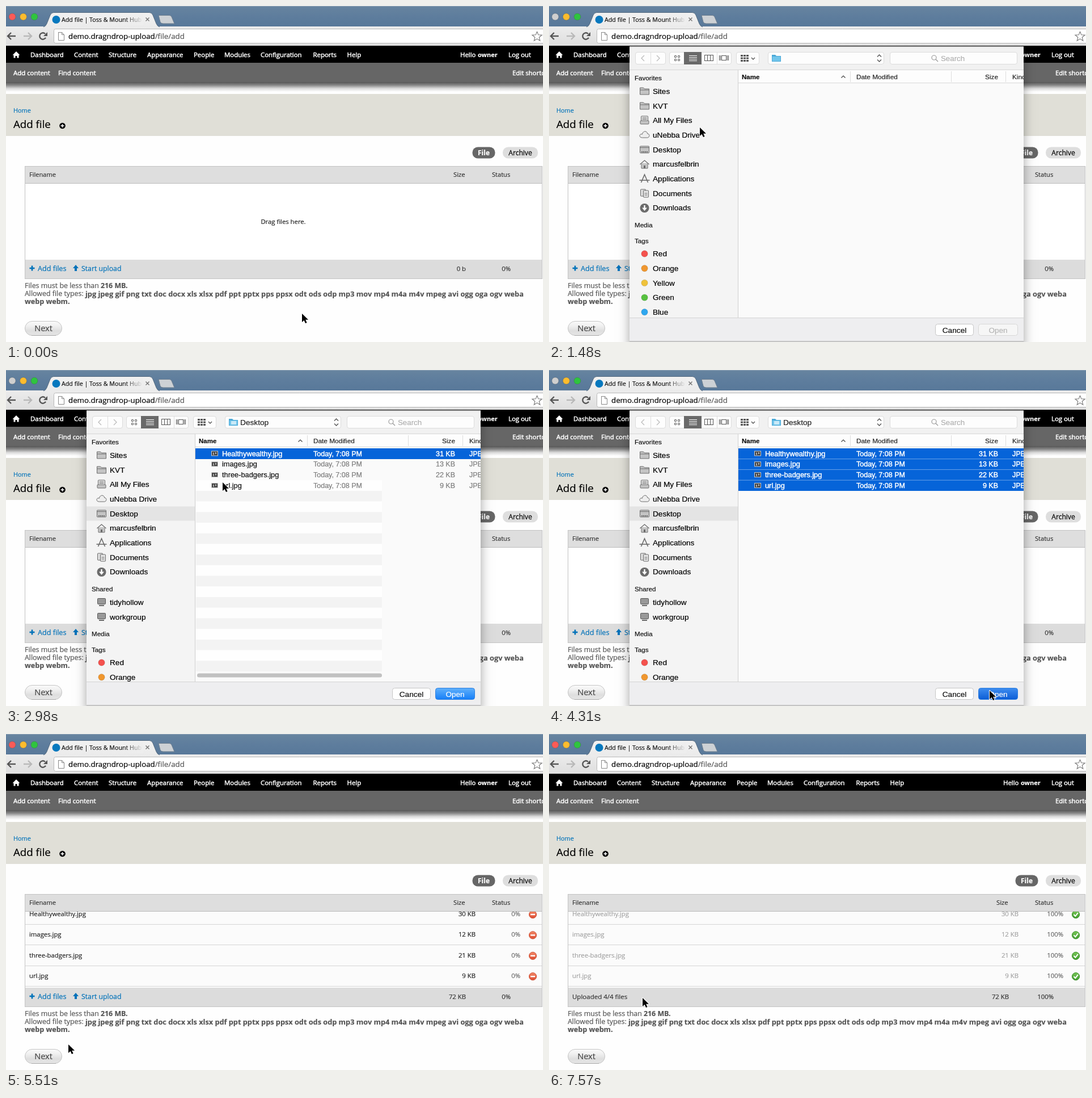
These frames come from a looping animation (947 px wide and 592 px high, 8000 ms). An HTML page with a canvas:

```html
<!DOCTYPE html>
<html lang="en">
<head>
<meta charset="utf-8">
<title>Add file</title>
<style>
html, body { margin: 0; width: 100%; height: 100%; overflow: hidden; background: #fff; }
canvas { display: block; width: 947px; height: 592px; }
</style>
</head>
<body>
<canvas id="stage" width="947" height="592"></canvas>
<script>
const W = 947, H = 592, LOOP = 8000;
const c = document.getElementById('stage').getContext('2d');
const PAGE = '"Open Sans", "Noto Sans", sans-serif';
const SYS = '"Liberation Sans", Arial, sans-serif';
const BLUE = '#0072b9';

// ---------- timing ----------
// Screen updates: first time, last time, count
const steps = [0];
for (const [a, b, n] of [[140, 590, 4], [1190, 1480, 3], [1650, 2100, 4], [2250, 3130, 7],
  [3420, 4460, 8], [4610, 4910, 3], [5210, 5510, 3], [5650, 6230, 5], [6380, 7420, 8], [7570, 7570, 1]])
  for (let i = 0; i < n; i++) steps.push(n > 1 ? Math.floor((a + (b - a) * i / (n - 1)) / 10) * 10 : a);

const path = [[0, 522, 542], [590, 88, 458], [1190, 88, 458], [1480, 266, 214], [1650, 215, 248], [1800, 215, 248],
  [2100, 400, 175], [2400, 392, 145], [2550, 392, 145], [2970, 382, 198], [3565, 382, 198], [4150, 777, 565],
  [4610, 777, 565], [4910, 690, 552], [5210, 560, 549], [5505, 110, 547], [5950, 165, 465], [8000, 165, 465]];

function pointer(t) {
  let i = 1;
  while (path[i][0] < t) i++;
  const [t0, x0, y0] = path[i - 1], [t1, x1, y1] = path[i];
  const u = (t - t0) / (t1 - t0), e = u * u * (3 - 2 * u);
  return [x0 + (x1 - x0) * e, y0 + (y1 - y0) * e];
}

// ---------- drawing helpers ----------
function rect(x, y, w, h, fill) { c.fillStyle = fill; c.fillRect(x, y, w, h); }

function grad(y0, y1, ...cols) {
  const g = c.createLinearGradient(0, y0, 0, y1);
  cols.forEach((k, i) => g.addColorStop(i / (cols.length - 1), k));
  return g;
}

function paint(fill, edge) {
  if (fill) { c.fillStyle = fill; c.fill(); }
  if (edge) { c.strokeStyle = edge; c.lineWidth = 1; c.stroke(); }
}

function box(x, y, w, h, r, fill, edge) {
  c.beginPath();
  c.roundRect(x, y, w, h, r);
  paint(fill, edge);
}

function disc(x, y, r, fill, edge) {
  c.beginPath();
  c.arc(x, y, r, 0, 7);
  paint(fill, edge);
}

function trace(pts) {
  c.beginPath();
  for (let i = 0; i < pts.length; i += 2) c.lineTo(pts[i], pts[i + 1]);
}

function line(color, width, ...pts) {
  trace(pts);
  c.strokeStyle = color;
  c.lineWidth = width;
  c.stroke();
}

function poly(fill, ...pts) {
  trace(pts);
  c.closePath();
  paint(fill);
}

// y is the middle of the line; heavy thickens the strokes
function text(s, x, y, size, color, { face = PAGE, weight = 400, align = 'left', heavy = .2 } = {}) {
  c.font = `${weight} ${size}px ${face}`;
  c.textAlign = align;
  c.fillStyle = c.strokeStyle = color;
  c.lineWidth = heavy;
  c.lineJoin = 'round';
  const base = Math.round(y + size * .36);
  c.fillText(s, x, base);
  c.strokeText(s, x, base);
  c.lineJoin = 'miter';
  return c.measureText(s).width;
}
const sys = (s, x, y, size, color, o) => text(s, x, y, size, color, { face: SYS, ...o });

function clipped(x, y, w, h, draw) {
  c.save();
  c.beginPath();
  c.rect(x, y, w, h);
  c.clip();
  draw();
  c.restore();
}

// ---------- browser ----------
function browser(inactive) {
  rect(0, 0, W, 37, grad(0, 37, '#67849f', '#5e7d9d', '#587899'));
  rect(0, 0, W, 1, '#8aa0b4');
  rect(0, 36, W, 34, grad(36, 70, '#ececec', '#dedede'));
  [inactive ? '#cfcfcf' : '#fc5b57', '#fdbc2e', '#2fc43f'].forEach((k, i) => disc(11 + i * 19.5, 19, 6, k, 'rgba(60,60,60,.25)'));

  c.beginPath();
  c.moveTo(66, 37);
  c.quadraticCurveTo(70, 36, 72, 31);
  c.lineTo(78, 16);
  c.quadraticCurveTo(80, 11.5, 84, 11.5);
  c.lineTo(253, 11.5);
  c.quadraticCurveTo(257, 11.5, 259, 16);
  c.lineTo(265, 31);
  c.quadraticCurveTo(267, 36, 271, 37);
  paint(grad(12, 37, '#f1f1f1', '#ebebeb'), '#52697f');

  c.beginPath();
  c.moveTo(269, 16.5);
  c.lineTo(288, 16.5);
  c.quadraticCurveTo(291, 16.5, 292, 19);
  c.lineTo(297, 31);
  c.lineTo(277, 31);
  c.quadraticCurveTo(273, 31, 272, 28);
  c.closePath();
  paint('#cdd1d5', '#6d7e8f');

  disc(88.5, 24, 7, '#0678be');
  clipped(98, 12, 142, 25, () => text('Add file | Toss & Mount Hub', 98, 24, 10.7, '#111'));
  const fade = c.createLinearGradient(208, 0, 241, 0);
  fade.addColorStop(0, 'rgba(238,238,238,0)');
  fade.addColorStop(1, '#eee');
  rect(208, 15, 34, 19, fade);
  line('#777', 1.4, 246.5, 20.5, 252.5, 26.5);
  line('#777', 1.4, 252.5, 20.5, 246.5, 26.5);

  const arrow = (x, d, k) => {
    line(k, 2.4, x - 7 * d, 53, x + 7 * d, 53);
    line(k, 2.4, x + d, 47, x + 7 * d, 53, x + d, 59);
  };
  arrow(10, -1, '#555');
  arrow(38, 1, '#b8b8b8');
  c.beginPath();
  c.arc(65, 53, 5.7, .5, 5.5);
  c.strokeStyle = '#555';
  c.lineWidth = 2.4;
  c.stroke();
  poly('#555', 73, 46, 73, 53, 66, 53);

  box(84.5, 40.5, 880, 25, 3, '#fff', '#b9b9b9');
  poly('#fff', 92, 46, 99, 46, 103, 50, 103, 61, 92, 61);
  line('#888', 1, 92.5, 46.5, 98.5, 46.5, 102.5, 50.5, 102.5, 60.5, 92.5, 60.5, 92.5, 46);
  line('#888', 1, 98.5, 46.5, 98.5, 50.5, 102.5, 50.5);
  const w = text('demo.dragndrop-upload', 110, 53, 13.3, '#000');
  text('/file/add', 110 + w, 53, 13.3, '#555');

  const star = [];
  for (let i = 0; i <= 10; i++) {
    const r = i % 2 ? 3.9 : 9, a = i * Math.PI / 5 - Math.PI / 2;
    star.push(936.5 + r * Math.cos(a), 54 + r * Math.sin(a));
  }
  line('#777', 1.1, ...star);
}

// ---------- page ----------
function adminBar() {
  rect(0, 70, W, 31, '#000');
  rect(0, 100, W, 35, '#666');
  rect(0, 134, W, 17, grad(134, 151, '#555', '#8a8a8a', '#dadada', '#fff'));
  poly('#fff', 18, 80, 24.5, 86.5, 22.5, 86.5, 22.5, 91.5, 19.5, 91.5, 19.5, 88, 16.5, 88, 16.5, 91.5, 13.5, 91.5, 13.5, 86.5, 11.5, 86.5);
  const nav = (s, x, y) => text(s, x, y, 11.4, '#fff', { heavy: .5 });
  [['Dashboard', 43], ['Content', 120], ['Structure', 181], ['Appearance', 249], ['People', 331], ['Modules', 385],
    ['Configuration', 449], ['Reports', 541.5], ['Help', 601.5], ['Hello', 801], ['Log out', 886]].forEach(([s, x]) => nav(s, x, 86));
  text('owner', 832, 86, 11, '#fff', { weight: 700 });
  nav('Add content', 13, 117.5);
  nav('Find content', 92, 117.5);
  nav('Edit shortcuts', 893, 117.5);
}

function page() {
  rect(0, 70, W, H - 70, '#fefefe');
  adminBar();
  rect(0, 155, W, 74, '#e0dfd7');
  text('Home', 13, 184.5, 10.9, BLUE);
  text('Add file', 13, 208.5, 18.7, '#000');
  disc(99.5, 211, 5.3, '#000');
  line('#fff', 1.6, 96.5, 211, 102.5, 211);
  line('#fff', 1.6, 99.5, 208, 99.5, 214);

  box(822.5, 248.5, 40, 20, 9.5, '#666');
  text('File', 842.5, 258.5, 11.9, '#fff', { weight: 700, align: 'center' });
  box(876, 248.5, 62, 20, 9.5, '#dedede');
  text('Archive', 907, 258.5, 12.1, '#111', { align: 'center', heavy: .3 });

  const grey = '#555', size = 12.4, bold = { weight: 700 };
  let w = text('Files must be less than ', 33, 493, size, grey);
  text('216 MB.', 33 + w, 493, size, grey, bold);
  w = text('Allowed file types: ', 33, 507, size, grey);
  text('jpg jpeg gif png txt doc docx xls xlsx pdf ppt pptx pps ppsx odt ods odp mp3 mov mp4 m4a m4v mpeg avi ogg oga ogv weba',
    33 + w, 507, 12.74, grey, bold);
  text('webp webm.', 33, 520.5, 12.6, grey, bold);

  box(33.5, 555.5, 65, 25, 12.5, grad(555, 581, '#fbfbfb', '#f0f0f0', '#dedede', '#e6e6e6'), '#c4c4c4');
  line('#a8a8a8', 1, 45, 580.5, 88, 580.5);
  text('Next', 66, 568, 14.6, '#444', { align: 'center' });
}

// ---------- upload table ----------
const files = [['Healthywealthy.jpg', 30], ['images.jpg', 12], ['three-badgers.jpg', 21], ['url.jpg', 9]];

function mark(y, ok) {
  disc(929, y, 6.6, ok ? grad(y - 7, y + 7, '#7cc85a', '#3d9c2c') : grad(y - 7, y + 7, '#f28a68', '#dd4a30'), ok ? '#3b8f2b' : '#cf5a42');
  if (ok) line('#fff', 2, 925.5, y, 928.3, y + 3, 932.8, y - 3);
  else line('#fff', 2.4, 925, y, 933, y);
}

function table(listed, up) {
  const right = { align: 'right' };
  rect(33, 313, 913, 134, listed ? '#fbfbfb' : '#fff');
  if (listed) clipped(33, 313, 913, 134, () => files.forEach(([name, kb], i) => {
    const y = 317 + i * 36.4, done = up && i < up.done, active = up && i === up.done;
    if (active) rect(33, y - 17, 913, 36, grad(y - 17, y + 19, '#fafde9', '#f0f6d6'));
    rect(33, Math.round(y + 18), 913, 1, '#d6d6d6');
    const ink = done ? '#a2a2a2' : '#222';
    text(name, 41, y, 11.3, ink);
    text(kb + ' KB', 828, y, 11.3, ink, right);
    text(done || (active && up.full) ? '100%' : '0%', 907, y, 11.3, '#666', right);
    if (!up || done) mark(y + 1, done);
  }));
  else text('Drag files here.', 489, 380, 11.3, '#222', { align: 'center' });

  rect(33, 282, 913, 31, '#dedede');
  rect(33, 312, 913, 1, '#bdbdbd');
  rect(33, 447, 913, 34, '#dcdcdc');
  c.strokeStyle = '#c3c3c3';
  c.lineWidth = 1;
  c.strokeRect(33.5, 282.5, 912, 198);
  text('Filename', 41, 297, 11.1, '#333');
  text('Size', 789, 297, 11.3, '#333');
  text('Status', 857, 297, 11.1, '#333');

  let total = 0;
  if (up) {
    const sent = files.reduce((n, f, i) => n + (i < up.done || (i === up.done && up.full) ? f[1] : 0), 0);
    total = Math.ceil(sent / 72 * 100);
    text(`Uploaded ${up.done}/4 files`, 41, 462.5, 11.5, '#333');
    if (up.done < 4) {
      box(653.5, 456.5, 78, 10, 0, '#fff', '#bbb');
      rect(655, 458, 76 * total / 100, 7, '#cdea77');
    }
  } else {
    line(BLUE, 2.6, 41.5, 462, 50.5, 462);
    line(BLUE, 2.6, 46, 457.5, 46, 466.5);
    poly(BLUE, 123, 456, 128, 462, 125, 462, 125, 467, 121, 467, 121, 462, 118, 462);
    text('Add files', 56, 462.5, 12.6, BLUE);
    text('Start upload', 133, 462.5, 12.3, BLUE);
  }
  text(listed ? '72 KB' : '0 b', 811, 462.5, 11.3, '#333', right);
  text(total + '%', 890, 462.5, 11.3, '#333', right);
}

// ---------- file dialog ----------
const places = ['Sites', 'KVT', 'All My Files', 'uNebba Drive', 'Desktop', 'marcusfelbrin', 'Applications', 'Documents', 'Downloads'];
const tags = [['Red', '#f4524e'], ['Orange', '#f0972f'], ['Yellow', '#efc23b'], ['Green', '#57c140'], ['Blue', '#2fa7ef']];

function placeIcon(i, y) {
  const k = '#6b6b6b', fill = '#c4c4c4', x = 168.5;
  if (i < 2) {
    poly(fill, x - 8, y - 6, x - 2, y - 6, x, y - 4, x + 8, y - 4, x + 8, y + 6, x - 8, y + 6);
    line(k, 1, x - 8, y + 6, x - 8, y - 6, x - 2, y - 6, x, y - 4, x + 8, y - 4, x + 8, y + 6, x - 8, y + 6);
    line(k, 1, x - 8, y - 2, x + 8, y - 2);
  } else if (i === 2) {
    box(x - 6, y - 7, 12, 10, 1, '#e4e4e4', k);
    box(x - 7.5, y + 1, 15, 6, 1, fill, k);
    line(k, 1, x - 4, y - 4, x + 4, y - 4);
    line(k, 1, x - 4, y - 1.5, x + 4, y - 1.5);
  } else if (i === 3) {
    c.beginPath();
    c.moveTo(x - 4, y + 5);
    c.bezierCurveTo(x - 11, y + 5, x - 9, y - 3, x - 4, y - 1);
    c.bezierCurveTo(x - 3, y - 8, x + 5, y - 7, x + 5, y - 2);
    c.bezierCurveTo(x + 10, y - 2, x + 9, y + 5, x + 5, y + 5);
    c.closePath();
    paint('#eee', k);
  } else if (i === 4) {
    box(x - 8, y - 6, 16, 12, 1, fill, k);
    line(k, 1, x - 8, y - 3.5, x + 8, y - 3.5);
    for (let d = -5; d < 6; d += 3) rect(x + d - .5, y + 3, 2, 2, k);
  } else if (i === 5) {
    rect(x - 5, y - 2, 10, 9, fill);
    line(k, 1.3, x - 8, y, x, y - 7, x + 8, y);
    line(k, 1, x - 5.5, y - 1, x - 5.5, y + 7, x + 5.5, y + 7, x + 5.5, y - 1);
    rect(x - 1.5, y + 2, 3, 5, k);
  } else if (i === 6) {
    line(k, 1.6, x - 6, y + 7, x, y - 7, x + 6, y + 7);
    line(k, 1.6, x - 9, y + 3, x + 9, y + 3);
  } else if (i === 7) {
    box(x - 7, y - 7, 9, 12, 1, '#ddd', k);
    box(x - 2, y - 5, 9, 12, 1, '#e4e4e4', k);
    line(k, 1, x, y, x + 5, y);
    line(k, 1, x, y + 3, x + 5, y + 3);
  } else {
    disc(x, y, 8, '#6b6b6b');
    rect(x - 1.2, y - 5, 2.4, 5, '#fff');
    poly('#fff', x - 4.5, y - .5, x + 4.5, y - .5, x, y + 5);
  }
}

function sidebar(loaded) {
  rect(142, 113, 192, 437, '#f4f4f4');
  const head = (s, y) => sys(s, 151, y, 11.6, '#111');
  const item = (s, y) => sys(s, 183, y, 13.6, '#000');
  head('Favorites', 127);
  if (loaded) rect(142, 240.5, 192, 25, '#e4e4e4');
  places.forEach((s, i) => {
    const y = 150 + i * 25.7;
    placeIcon(i, Math.round(y));
    item(s, y);
  });
  let y = 386;
  if (loaded) {
    head('Shared', y);
    ['tidyhollow', 'workgroup'].forEach((s, i) => {
      const r = Math.round(409 + i * 25.7);
      box(161.5, r - 6.5, 14, 10, 1, '#999', '#555');
      rect(164, r + 5, 9, 2, '#666');
      item(s, r);
    });
    y += 79;
  }
  head('Media', y);
  head('Tags', y + 27.5);
  tags.forEach(([s, k], i) => {
    disc(168.5, y + 50.5 + i * 25.7, 5.7, k, 'rgba(0,0,0,.12)');
    item(s, y + 50.5 + i * 25.7);
  });
}

function toolbar(loaded) {
  const k = '#555', button = (x, w) => box(x + .5, 81.5, w, 21, 3.5, '#fdfdfd', '#dcdcdc');
  button(152, 53);
  line('#ddd', 1, 179.5, 82, 179.5, 102);
  line('#bbb', 1.3, 168, 87, 163, 92, 168, 97);
  line('#bbb', 1.3, 190, 87, 195, 92, 190, 97);
  button(212, 109);
  rect(238, 81, 31, 22, '#696969');
  line('#ddd', 1, 296.5, 82, 296.5, 102);
  for (let i = 0; i < 4; i++) {
    box(221.5 + i % 2 * 6, 87.5 + (i >> 1) * 6, 3, 3, .5, null, k);
    line('#fff', 1, 247, 87.5 + i * 3, 261, 87.5 + i * 3);
  }
  c.strokeStyle = k;
  c.strokeRect(274.5, 86.5, 15, 10);
  line(k, 1, 279.5, 87, 279.5, 97);
  line(k, 1, 284.5, 87, 284.5, 97);
  c.strokeRect(304.5, 87.5, 8, 8);
  [300.5, 302.5, 314.5, 316.5].forEach(x => line(k, 1, x, 87, x, 96));
  button(330, 40);
  for (let i = 0; i < 9; i++) rect(338 + i % 3 * 5, 86 + Math.floor(i / 3) * 4.5, 4, 3, k);
  line(k, 1.4, 357, 91, 360, 94, 363, 91);
  button(386, 204);
  poly('#4aa9d8', 393, 86, 399, 86, 401, 88, 409, 88, 409, 98, 393, 98);
  rect(394, 89, 14, 8, '#72c5ea');
  if (loaded) {
    rect(397, 90, 9, 6, '#c9e9f7');
    sys('Desktop', 413, 92, 13.7, '#222');
  }
  line(k, 1.4, 579, 89.5, 582.5, 86, 586, 89.5);
  line(k, 1.4, 579, 94.5, 582.5, 98, 586, 94.5);
  button(601, 224);
  c.beginPath();
  c.arc(679, 91, 4, 0, 7);
  c.strokeStyle = '#999';
  c.lineWidth = 1.2;
  c.stroke();
  line('#999', 1.3, 682, 94, 686, 98);
  sys('Search', 691, 92, 13.3, '#b0b0b0');
}

function fileList(loaded, picked, striped) {
  const pitch = 18.72;
  rect(334, 113, 503, 437, '#fafafa');
  rect(334, 113, 503, 22, '#fdfdfd');
  rect(334, 135, 503, 1, '#d8d8d8');
  [531, 709, 805].forEach(x => rect(x, 115, 1, 19, '#ddd'));
  sys('Name', 340, 124.5, 11.5, '#111', { weight: 700 });
  line('#444', 1.2, 515.5, 126.5, 519, 123, 522.5, 126.5);
  sys('Date Modified', 542, 124.5, 11.8, '#222');
  sys('Size', 792, 124.5, 11.8, '#222', { align: 'right' });
  sys('Kind', 817, 124.5, 11.8, '#222');
  if (!loaded) return;
  if (striped) {
    for (let i = 3; i < 21; i++) rect(335, 138 + i * pitch, 328, pitch, i % 2 ? '#fefefe' : '#f3f3f3');
    box(337, 534.5, 326, 7, 3.5, '#c1c1c1');
  }
  rect(334, 138, 503, Math.round(picked * pitch), '#0664d9');
  for (let i = 1; i < picked; i++) rect(334, 137.5 + i * pitch, 503, 1, 'rgba(255,255,255,.4)');
  files.forEach(([name, kb], i) => {
    const y = 147 + i * 18.8, on = i < picked, heavy = on ? .45 : .2, k = on ? '#fff' : '#7c7c7c';
    rect(362, y - 4.5, 12, 9, '#ccc');
    rect(363, y - 3.5, 10, 7, '#444');
    rect(365, y - 1.5, 2, 4, '#aaa');
    rect(369, y - 2, 2, 3, '#bbb');
    sys(name, 381, y, 12.8, on ? '#fff' : '#111', { heavy });
    sys('Today, 7:08 PM', 542, y, 12.5, k, { heavy });
    sys(kb + (kb > 9) + ' KB', 792, y, 12.5, k, { align: 'right', heavy });
    sys('JPEG image', 817, y, 12.5, k, { heavy });
  });
}

function dialog(loaded, picked, striped, pressed) {
  clipped(0, 70, W, H - 70, () => {
    c.shadowColor = 'rgba(0,0,0,.36)';
    c.shadowBlur = 18;
    c.shadowOffsetY = 5;
    rect(142, 71, 695, 530, '#eee');
  });
  clipped(142, 71, 695, 521, () => {
    rect(142, 71, 695, 42, '#f1f1f1');
    rect(142, 71, 695, 3, grad(71, 74, '#c9c9c9', '#f1f1f1'));
    rect(142, 112, 695, 1, '#d6d6d6');
    toolbar(loaded);
    clipped(142, 113, 695, 437, () => {
      sidebar(loaded);
      fileList(loaded, picked, striped);
      rect(333, 113, 1, 437, '#cfcfcf');
    });
    rect(142, 549, 695, 43, '#eeeef0');
    rect(142, 549, 695, 1, '#d4d4d4');
    rect(142, 590, 695, 2, '#c4c4c4');
    box(681.5, 560.5, 67, 20, 4, '#fff', '#c6c6c6');
    sys('Cancel', 715, 571, 13.7, '#111', { align: 'center' });
    const blue = pressed ? grad(560, 581, '#3f8ef0', '#0a5cd6') : grad(560, 581, '#62b2fb', '#147df8');
    box(757.5, 560.5, 69, 20, 4, picked ? blue : '#f6f6f6', picked ? '#2c7fe0' : '#d8d8d8');
    sys('Open', 792, 571, 13.5, picked ? '#fff' : '#b5b5b5', { align: 'center' });
  });
}

function cursor(x, y) {
  c.save();
  c.translate(x, y);
  trace([0, 0, 0, 15, 3.5, 11.7, 6, 17, 8.6, 15.9, 6.2, 10.8, 11, 10.8]);
  c.closePath();
  c.lineJoin = 'round';
  c.strokeStyle = '#fff';
  c.lineWidth = 2;
  c.stroke();
  paint('#000');
  c.restore();
}

// ---------- scene ----------
function draw(t) {
  const s = steps.filter(v => v <= t).pop();
  const open = s >= 1190 && s < 4460;
  const picked = s >= 3560 ? 4 : s >= 2390 ? 1 : 0;
  let up = null;
  if (s >= 6380) {
    const n = Math.round((s - 6380) / 148.6);
    up = { done: +'001112234'[n], full: +'010010110'[n] };
  }
  page();
  browser(s >= 1190 && s < 4610);
  table(s >= 4760, up);
  if (open) dialog(s >= 1800, picked, s < 3420, s >= 4310);
  cursor(...pointer(s));
}

function tick(now) {
  draw(now % LOOP);
  requestAnimationFrame(tick);
}
requestAnimationFrame(tick);
</script>
</body>
</html>
```
